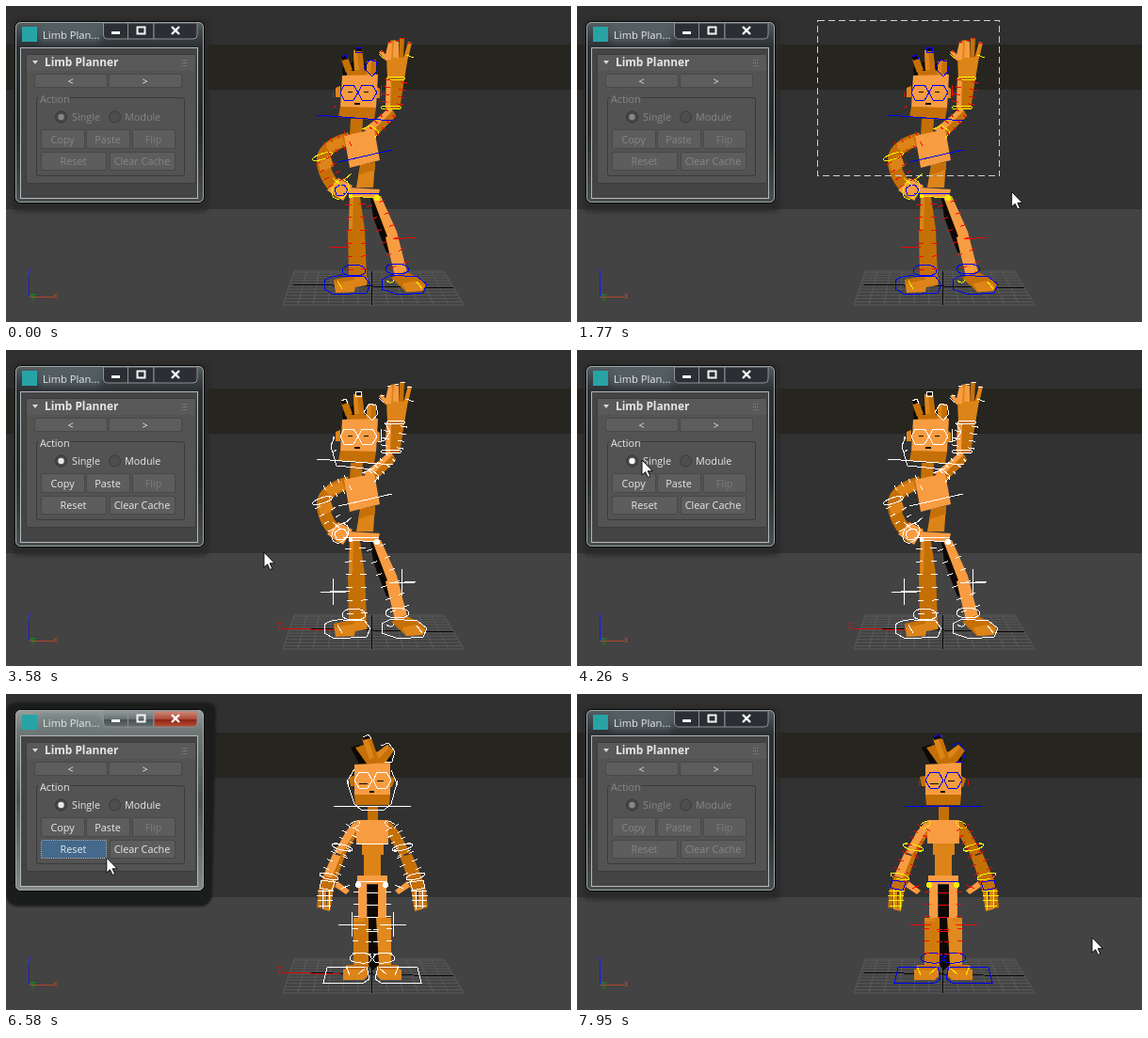
Animation, 600 px wide and 336 px high, one loop 7.99 s. Source, as an HTML page:

```html
<!DOCTYPE html>
<html lang="en">
<head>
<meta charset="utf-8">
<title>Posing a rig</title>
<style>
html, body { margin: 0; width: 100%; height: 100%; overflow: hidden; background: #434343 }
svg { display: block }
text { font: 10.8px "Open Sans", "Noto Sans", sans-serif; fill: #e8e8e8 }
.mid { text-anchor: middle }
.l { fill: #f89c42 } .m { fill: #dd8418 } .d { fill: #c57006 } .k { fill: #0c0804 }
.limb { fill: var(--limb, #f89c42) } .shin { fill: var(--shin, #d07a0e) }
.arm { fill: none; stroke: #c57006; stroke-width: 14 }
.crisp, .rig path, .rig ellipse, .focus { fill: none; shape-rendering: crispEdges }
.b { stroke: #0000f4 } .y { stroke: #f4f000 } .r { stroke: #f00808 } .w { stroke: none }
.rig .dot { fill: #f4f000 }
.sel .rig * { stroke: #fff }
.sel .rig .dot { fill: #fff }
.only { visibility: hidden }
.sel .only { visibility: visible }
.group, .act-text { fill: #868686 }
.on .group, .sel .act-text { fill: #e8e8e8 }
.off { fill: #7c7c7c }
.btn { fill: #5d5d5d; stroke: #484848 }
.hot .btn { fill: #44698c; stroke: #3a5a78 }
.focused .focus { stroke: #b4b4b4; stroke-dasharray: 1 1 }
.shade { fill: #292929; opacity: .8; filter: blur(2px) }
.frame { fill: url(#dim) }
.cap, .close { fill: #2b2f33 }
.active .frame { fill: url(#bright) }
.active .cap { fill: url(#steel) }
.active .close { fill: url(#red) }
.active .shade { fill: #1b1d1d; opacity: 1; filter: blur(1px) }
.grow { visibility: hidden }
.active .grow { visibility: visible }
</style>
</head>
<body>
<svg id="stage" width="600" height="336" viewBox="0 0 600 336">
  <defs>
    <linearGradient id="dim" x2="0" y2="1">
      <stop stop-color="#596165"/><stop offset=".07" stop-color="#3d4448"/>
      <stop offset=".14" stop-color="#2b3033"/><stop offset=".6" stop-color="#25292c"/><stop offset="1" stop-color="#4a4f51"/>
    </linearGradient>
    <linearGradient id="bright" x2="0" y2="1">
      <stop stop-color="#98a09c"/><stop offset=".12" stop-color="#6f7876"/>
      <stop offset=".5" stop-color="#4a5051"/><stop offset="1" stop-color="#84898a"/>
    </linearGradient>
    <linearGradient id="steel" x2="0" y2="1">
      <stop stop-color="#929b9c"/><stop offset=".5" stop-color="#6a7374"/><stop offset=".52" stop-color="#464e50"/><stop offset="1" stop-color="#636c6e"/>
    </linearGradient>
    <linearGradient id="red" x2="0" y2="1">
      <stop stop-color="#d08a7c"/><stop offset=".5" stop-color="#b04c3c"/><stop offset=".52" stop-color="#8c2012"/><stop offset="1" stop-color="#b85038"/>
    </linearGradient>
  </defs>

  <rect width="600" height="336" fill="#434343"/>
  <rect width="600" height="216" fill="#323232"/>
  <rect width="600" height="89" fill="#262520"/>
  <rect width="600" height="41" fill="#303030"/>

  <path id="grid" fill="none" stroke="#626262" stroke-width=".7"/>
  <path class="crisp" d="M304 296L475 300M388.500 282V318" stroke="#080808"/>
  <g class="only">
    <path class="crisp" d="M293 296.500L355 297.500" stroke="#e00808"/>
    <text x="288" y="296" style="fill:#e01414;font-size:10px">z</text>
  </g>

  <!-- Corner axes -->
  <g class="crisp">
    <path d="M24.500 309V286" stroke="#1818f8"/>
    <path d="M25 309.500H50" stroke="#b04828"/>
    <path d="M25 309l4-3" stroke="#189018"/>
  </g>
  <g style="font-weight:bold">
    <text x="23" y="285" style="fill:#2828ff;font-size:9px">z</text>
    <text x="50" y="311" style="fill:#c05030;font-size:9px">x</text>
    <text x="27" y="311" style="fill:#209820;font-size:9px">y</text>
  </g>

  <g id="wave">
    <path class="k" d="M387 203L395 210L406 240L413 263L404 262L390 225z"/>
    <path class="d" d="M365 203h11l5 35h-17z M363 238h18l2 51h-19z"/>
    <path class="m" d="M365 203h4l-1 34h-4z M348 291l22-4 14 2-1 8-12 2-1 5-20 1z"/>
    <path class="l" d="M389 203l9-1 17 38-10 5z M403 246l12-6 11 43-13 4z"/>
    <path class="d" d="M348 291l22-4v4l-20 4z M409 289l15-7 16 8 6 7-3 6-18 1z"/>
    <path class="m" d="M421 295l15-3 8 5-2 6-17 1z"/>
    <path class="l" d="M379 131l13 8 22-22-6-10-12 11z"/>
    <path class="d" d="M392 139l22-22-3-6-24 24z M404 77l19 1-5 32-15-1z"/>
    <path class="m" d="M404 54h23l-4 24-18-1z M407 56l1-19 5-1 3 20z M422 56l5-18 4 1-4 17z"/>
    <path class="l" d="M404 77l5 1-1 31-5-1z M403 58l-7-9 3-2 9 10z M402 56l4-17 4 1-1 17z M411 55l1-18 5 1v17z"/>
    <path class="d" d="M417 55l1-21h5l-1 21z"/>
    <path class="arm" d="M365 141Q335 149 337 167T357 200"/>
    <path class="m" d="M331 166l14-5 3 9-13 7z M337 147l7 8 16-7-3-9z"/>
    <path class="l" d="M353 183l15 8-10 16-17-11z"/>
    <path class="d" d="M366 120h13l-1 17h-13z"/>
    <path class="m" d="M372 193l4-24 16-3-2 27z"/>
    <path class="d" d="M374 180l3-11 15-3v8z"/>
    <path class="l" d="M359 138l32-7 6 33-32 8z M364 193l33 2-2 8h-31z"/>
    <path class="k" d="M357 66l12-7 12 2 11 6 1 6h-35z"/>
    <path class="d" d="M369 47l9-1 3 24h-11z M355 54l7-2 6 16-7 3z M383 59l10-2v16h-9z M362 69h30l2 5h-32z"/>
    <path class="m" d="M369 47h4l2 21h-5z M383 59l5-1-1 15h-4z M350 87l5-2v12h-5z M394 86l3 2v10h-4z"/>
    <path class="k" d="M355 54l7-2 1 4-6 2z M371 45h6v3h-6z"/>
    <path class="l" d="M357 74l38-1-2 35h-38z"/>
    <path class="d" d="M355 107l38 1-2 13-38-3z"/>
    <path class="k" d="M370 103h6v2h-6z M363 91h5v1h-5z M380 91h5v1h-5z"/>
    <g class="rig">
      <path class="b" d="M355 92l4-8h10l5 8-5 8h-10z M374 92l4-8h11l5 8-5 8h-11z M330 116L411 122 M353 166L410 153 M358 199h38 M355 190l-6 4 2 7 8 1 4-6-4-6z M371 44h6v5h-6z M380 66l6-9 7 2 2 9-6 7z M356 54l5-2 2 5"/>
      <path class="b" d="M338 292q8-6 20-5l23 1 6 8-4 9-34 2-11-6z M399 291l10-5 28 2 10 8-4 9-26 2-18-6z M357 282q1-7 12-7t13 6q0 6-12 6t-13-5z M403 280q1-6 11-6t14 5q0 6-12 6t-13-5z"/>
      <ellipse class="y" cx="409" cy="108" rx="11" ry="2"/>
      <ellipse class="y" cx="414" cy="77" rx="10" ry="2"/>
      <ellipse class="y" cx="336" cy="160" rx="11" ry="3" transform="rotate(-18 336 160)"/>
      <ellipse class="y" cx="355" cy="195" rx="8" ry="11" transform="rotate(35 355 195)"/>
      <path class="y" d="M365 202l28 2 M378 131l10-4 8 7-5 7 M347 183l9 8 M359 185l8-7 M352 292l5 9 M436 293l6 8 M404 292q6 5 8-1 M396 51l5 5 M425 52l8 3"/>
      <ellipse class="y dot" cx="394" cy="204" rx="2.5" ry="2.5"/>
      <ellipse class="y dot" cx="366" cy="202" rx="2" ry="2"/>
      <path class="r" d="M344 256h21 M411 248l24-2 M347 92v5 M398 84v12 M351 106l-4 3 M398 48h4 M405 38h4 M413 36h4 M419 34h5 M426 39h5"/>
      <path class="r" id="waveTicks"/>
      <path class="w" d="M334 257h27M347 243v28M407 247h27M420 233v28 M349 92l-4 10 6 21 39 4 5-8 M395 98l7-2 6-9-6-10"/>
    </g>
  </g>

  <g id="rest">
    <g id="half">
      <path class="limb" d="M371 135l-10 11-13 24 10 3 16-27z M348 168l11 4-8 26-14-5z"/>
      <path class="d" d="M371 146l3 1-15 26-4-1z M337 193l14 4-4 15-15-4z M356 171l4 1-9 25-5-2z M332 208l4 1-1 19-5-1z"/>
      <path class="l" d="M352 199l13 10-4 4-12-8z"/>
      <path class="m" d="M336 209l4 1v20l-4-1z M342 210l5 2-3 19-4-1z"/>
      <path class="l" d="M374 202h9v37h-9z"/>
      <path class="shin" d="M369 238h16v52h-16z"/>
      <path class="d" d="M362 288h23l-2 6h-24z"/>
      <path class="m" d="M358 293h22l4-3v10l-4 4h-22z M369 238h11v4h-11z"/>
    </g>
    <use href="#half" transform="matrix(-1 0 0 1 778 0)" style="--limb:#c57006;--shin:#e08a20"/>
    <path class="k" d="M384 203h11v35h-2l3 50-7 6-4-6v-50h-1z"/>
    <path class="d" d="M384 119h11v15h-11z"/>
    <path class="m" d="M378 158h23v13h-23z M380 170h18v25h-18z"/>
    <path class="l" d="M372 134h34v25h-34z M373 193h32v9h-32z"/>
    <path class="k" d="M366 57l9-3 34 14-2 6h-32z"/>
    <path class="d" d="M378 47l9-3 9 26-10 2z M391 64l14-10 7 6-9 13h-11z M371 57l9-3 26 14-3 6h-20z M364 88l6-1v11h-4z M408 87l5 3-3 9h-2z"/>
    <path class="m" d="M378 47l5-2 8 22-5 3z M393 63l12-9 2 3-11 12z"/>
    <path class="k" d="M378 46l8-3 1 4-8 2z"/>
    <path class="l" d="M370 75l38-2v35h-38z"/>
    <path class="d" d="M370 107h38l-1 11h-36z"/>
    <path class="k" d="M386 103h5v2h-5z M375 95h9v1h-9z M394 92h7v1h-7z"/>
    <g class="rig">
      <path class="b" d="M370 92l5-9h9l5 9-5 8h-9z M390 92l4-9h10l5 9-5 8h-10z M348 119H430 M372 199h33 M379 46l6-3 3 5 M398 55l8-3 7 9-3 11-8 1"/>
      <ellipse class="y dot" cx="374" cy="203" rx="2.5" ry="2.5"/>
      <ellipse class="y dot" cx="403" cy="203" rx="2.5" ry="2.5"/>
      <path class="w" d="M370 80l-8 13 8 24 7 6h25l7-6 6-22-6-14 M372 159H406 M354 245h28M367 232v26M397 245h28M411 232v26"/>
      <g id="halfRig">
        <ellipse class="y" cx="357" cy="163" rx="11" ry="3" transform="rotate(14 357 163)"/>
        <ellipse class="y" cx="370" cy="139" rx="6" ry="3" transform="rotate(-30 370 139)"/>
        <ellipse class="y" cx="343" cy="194" rx="10" ry="3" transform="rotate(14 343 194)"/>
        <path class="y" d="M331 209h17 M330 214h17 M331 219h16 M332 225h13 M336 208v20 M343 210v19 M361 289l4 10 M381 292l-7 6"/>
        <path class="b" d="M337 307l4-16 42-1 3 13-6 4z M365 281q2-6 12-6t11 6-11 5-12-5z M335 198l14 2-3 9-13-3z"/>
        <path class="r" d="M353 245h23 M383 252h7 M363 92v5 M356 207l9-4"/>
        <path class="r" id="restTicks"/>
      </g>
      <use href="#halfRig" transform="matrix(-1 0 0 1 778 0)"/>
    </g>
  </g>

  <rect id="marquee" class="crisp" x="255.5" y="15.5" stroke="#d0d0d0" stroke-dasharray="7 4"/>

  <!-- Floating tool window -->
  <g id="win">
    <path class="shade grow" d="M0 20Q1 9 12 9H212Q223 9 223 20L219 214Q217 226 206 226H14Q1 226 0 214z"/>
    <rect class="shade" x="6" y="13" width="210" height="206" rx="8"/>
    <rect class="frame" x="9.5" y="16.5" width="201" height="193" rx="6" stroke="#050505"/>
    <rect x="10.5" y="17.5" width="199" height="191" rx="5" fill="none" stroke="#a4aaac"/>
    <rect x="33" y="21" width="70" height="19" rx="8" fill="#66757c" opacity=".45" style="filter:blur(3px)"/>
    <rect x="17" y="22" width="16" height="16" fill="#27a3a6"/>
    <text x="39" y="35" style="font-size:11.2px">Limb Plan...</text>
    <path class="cap" d="M103.500 18V31q0 4 4 4H157V18z" stroke="#8a9094"/>
    <path class="close" d="M157 18H203V31q0 4-4 4H157z" stroke="#8a9094"/>
    <path d="M129.500 18V35" stroke="#8a9094"/>
    <path d="M112 28.500h9" stroke="#f4f4f4" stroke-width="3"/>
    <rect x="139.500" y="22.500" width="8" height="7" fill="none" stroke="#f4f4f4" stroke-width="2"/>
    <path d="M176 22l8 8M184 22l-8 8" stroke="#fff" stroke-width="2.400"/>
    <rect x="15.5" y="44.5" width="188" height="160" fill="#444" stroke="#b4b8ba"/>
    <rect x="21.5" y="51.500" width="180" height="137" rx="2" fill="#535353" stroke="#3c3c3c"/>
    <rect x="22" y="52" width="179" height="17" fill="#595959"/>
    <path d="M28 58h6l-3 4z" fill="#d8d8d8"/>
    <path d="M187 57.500h6M187 60.500h6M187 63.500h6" stroke="#8a8a8a" stroke-dasharray="1 1"/>
    <text x="41" y="64" style="font-size:11.8px;font-weight:bold">Limb Planner</text>
    <rect x="32.5" y="97.500" width="157" height="83" rx="2" fill="none" stroke="#3a3a3a"/>
    <rect x="35" y="94" width="33" height="8" fill="#535353"/>
    <text class="group" x="36" y="103">Action</text>
    <circle cx="58.500" cy="118" r="6" fill="#474747" stroke="#363636"/>
    <circle id="radio" class="group" cx="58.500" cy="118" r="3.200"/>
    <circle cx="115.500" cy="118" r="6" fill="#4d4d4d" stroke="#3c3c3c"/>
    <text class="group" x="70" y="122">Single</text>
    <text class="group" x="126" y="122">Module</text>
    <g id="buttons"></g>
  </g>

  <path id="cursor" d="M0 0V16L3.600 12.700L6.300 18.400L8.800 17.200L6.200 11.700H11.300z" fill="#fff" stroke="#000" stroke-width=".9"/>
</svg>
<script>
const $ = id => document.getElementById(id);
const lerp = (a, b, p) => a + (b - a) * p;
const smooth = p => p * p * (3 - 2 * p);

// Floor grid in perspective
let grid = '';
for (let i = 0; i <= 12; i++) {
  const p = i / 12, q = p ** 1.18, y = lerp(282, 318, q);
  grid += `M${lerp(306, 294, q)} ${y}H${lerp(465, 486, q)}`;
  grid += `M${lerp(306, 465, p)} 282L${lerp(294, 486, p)} 318`;
}
$('grid').setAttribute('d', grid);

// Short strokes across each limb: x1, y1, x2, y2, count, half length
const ticks = limbs => limbs.map(([x1, y1, x2, y2, n, h]) => {
  const len = Math.hypot(x2 - x1, y2 - y1), u = (y1 - y2) / len * h, v = (x2 - x1) / len * h;
  return Array.from({ length: n }, (_, i) => {
    const x = lerp(x1, x2, i / (n - 1)), y = lerp(y1, y2, i / (n - 1));
    return `M${x - u} ${y - v}l${u * .6} ${v * .6}M${x + u} ${y + v}l${-u * .6} ${-v * .6}`;
  }).join('');
}).join('');
$('waveTicks').setAttribute('d', ticks([
  [363, 141, 341, 152, 4, 9], [337, 164, 351, 188, 4, 10], [391, 133, 408, 114, 4, 7],
  [410, 103, 414, 80, 4, 12], [371, 211, 373, 280, 6, 11], [393, 210, 418, 275, 6, 11]]));
$('restTicks').setAttribute('d', ticks([
  [368, 142, 355, 169, 5, 8], [354, 171, 343, 197, 4, 10], [379, 211, 378, 276, 6, 10]]));

// label, x, y, width, height, text class
const buttons = [
  ['<', 30, 72, 78, 15, ''], ['>', 109, 72, 78, 15, ''],
  ['Copy', 37, 131, 47, 21, 'act-text'], ['Paste', 85, 131, 47, 21, 'act-text'], ['Flip', 134, 131, 46, 21, 'off'],
  ['Reset', 37, 155, 70, 20, 'act-text'], ['Clear Cache', 110, 155, 70, 20, 'act-text']
];
$('buttons').innerHTML = buttons.map(([label, x, y, w, h, kind]) => {
  const box = `x="${x + .5}" y="${y + .5}" width="${w - 1}" height="${h - 1}"`;
  return `<g><rect class="btn" ${box} rx="1.5"/><rect class="focus" ${box}/>
    <text class="mid ${kind}" x="${x + w / 2 - .5}" y="${y + h / 2 + 4}">${label.replace('<', '&lt;')}</text></g>`;
}).join('');
const buttonNodes = [...$('buttons').children];

// Pointer stops: time, x, y
const stops = [
  [0, 498, 350], [530, 498, 350], [1290, 255, 15], [1370, 255, 15], [2130, 521, 331], [2210, 516, 331],
  [3180, 516, 331], [3940, 69, 117], [4750, 69, 117], [5070, 70, 167], [6460, 70, 167], [7170, 547, 259], [7990, 547, 259]
];
const dragStart = 1370, dragEnd = 2130, release = 2850;

function drag(t) {
  const p = Math.max(0, Math.min(1, (t - dragStart) / (dragEnd - dragStart)));
  return [lerp(255, 521, 1 - (1 - p) ** 2), lerp(15, 331, 1 - (1 - p) ** 1.15)];
}

function pointer(t) {
  if (t >= dragStart && t < dragEnd) return drag(t);
  const i = stops.findIndex(s => s[0] > t), [t0, x0, y0] = stops[i - 1], [t1, x1, y1] = stops[i];
  const p = smooth((t - t0) / (t1 - t0));
  return [lerp(x0, x1, p), lerp(y0, y1, p)];
}

function draw() {
  const t = performance.now() % 7990, during = (a, b) => t >= a && t < b;
  const [x, y] = pointer(t), stage = $('stage').classList;
  const selected = during(release, 7260), reset = t >= 5930;

  stage.toggle('sel', selected);
  stage.toggle('on', during(2770, 7260));
  $('win').classList.toggle('active', during(4300, 7220));
  $('wave').style.display = reset ? 'none' : '';
  $('rest').style.display = reset ? '' : 'none';
  $('cursor').setAttribute('transform', `translate(${x} ${y})`);

  const [rx, ry] = drag(t - 40);
  $('marquee').style.display = during(dragStart, release) ? '' : 'none';
  $('marquee').setAttribute('width', Math.round(Math.min(rx, 515) - 255));
  $('marquee').setAttribute('height', Math.round(Math.min(ry, 329) - 15));

  $('radio').style.fill = selected && Math.hypot(x - 65, y - 118) < 10 ? '#fff' : '';
  buttons.forEach(([label, bx, by, w, h, kind], i) => {
    const inside = x >= bx && x < bx + w && y >= by && y < by + h;
    buttonNodes[i].classList.toggle('hot', selected && kind === 'act-text' && inside);
    buttonNodes[i].classList.toggle('focused', label === 'Reset' && during(5400, 7220));
  });
  requestAnimationFrame(draw);
}
draw();
</script>
</body>
</html>
```
